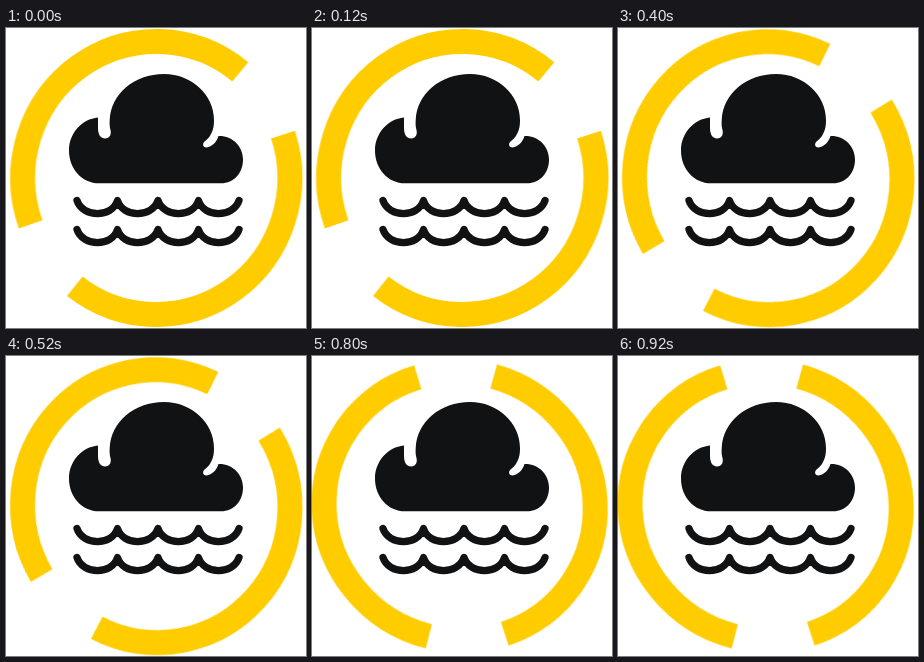
Write an HTML page that moves like this. It is 300 px wide and 300 px high and loops after 1 s.

```html
<!DOCTYPE html>
<html lang="en">
<head>
<meta charset="utf-8">
<title>Cloud and waves</title>
<style>
  html, body {
    margin: 0;
    width: 100%;
    height: 100%;
    overflow: hidden;
    background: #fff;
  }
  svg {
    display: block;
    width: 100%;
    height: 100%;
  }
  .ring {
    fill: none;
    stroke: #fc0;
    stroke-width: 25;
    transform-origin: 0 0;
    animation: spin 1s step-end infinite;
  }
  .cloud { fill: #111214; }
  .wave {
    fill: none;
    stroke: #111214;
    stroke-width: 7.3;
    stroke-linecap: round;
    stroke-linejoin: round;
  }
  /* The ring turns in uneven jumps and wobbles off centre. */
  @keyframes spin {
    0%   { transform: translate(150.3px, 150px) rotate(0deg); }
    20%  { transform: translate(150.2px, 149.8px) rotate(79.1deg); }
    40%  { transform: translate(150.2px, 150.2px) rotate(167.7deg); }
    60%  { transform: translate(150.5px, 150px) rotate(238.2deg); }
    80%  { transform: translate(147.7px, 150px) rotate(303.6deg); }
    100% { transform: translate(150.3px, 150px) rotate(360deg); }
  }
</style>
</head>
<body>
<svg viewBox="0 0 300 300" aria-label="Cloud over waves inside a turning ring">
  <defs>
    <path id="wave" d="M71 172.5
      C77 190 106 190 111.5 172.5
      C117 190 146 190 152 172.5
      C158 190 187 190 192.5 172.5
      C198 190 227 190 233 172.5"/>
  </defs>

  <g class="ring">
    <path d="M-125.7 46.3 A133.6 136.6 0 0 1 84 -106.2"/>
    <path d="M126.7 -43.3 A133.6 136.6 0 0 1 -81.5 108.2"/>
  </g>

  <path class="cloud" d="M92 89.5
    V100 C92 107 95 110.5 99 110.5
    C104 110.5 105.5 106 104.5 102
    C103.5 99 103.5 95 103.7 92
    C105 66 128 46 158 46
    C186 46 208 67 208 92
    C208 97 207.5 101 205.5 105
    C203.5 109.5 201 111.5 198.5 113.5
    C196 116 197 119.5 200.5 119.5
    C206 119 211 113.5 212.5 108
    C226 107.5 237 118 237 131.5
    C237 145 228 155.3 215 155.3
    H93 C76 155.3 63 141 63 122.5
    C63 105 76 91 92 89.5 Z"/>

  <use class="wave" href="#wave"/>
  <use class="wave" href="#wave" y="29"/>
</svg>
</body>
</html>
```
